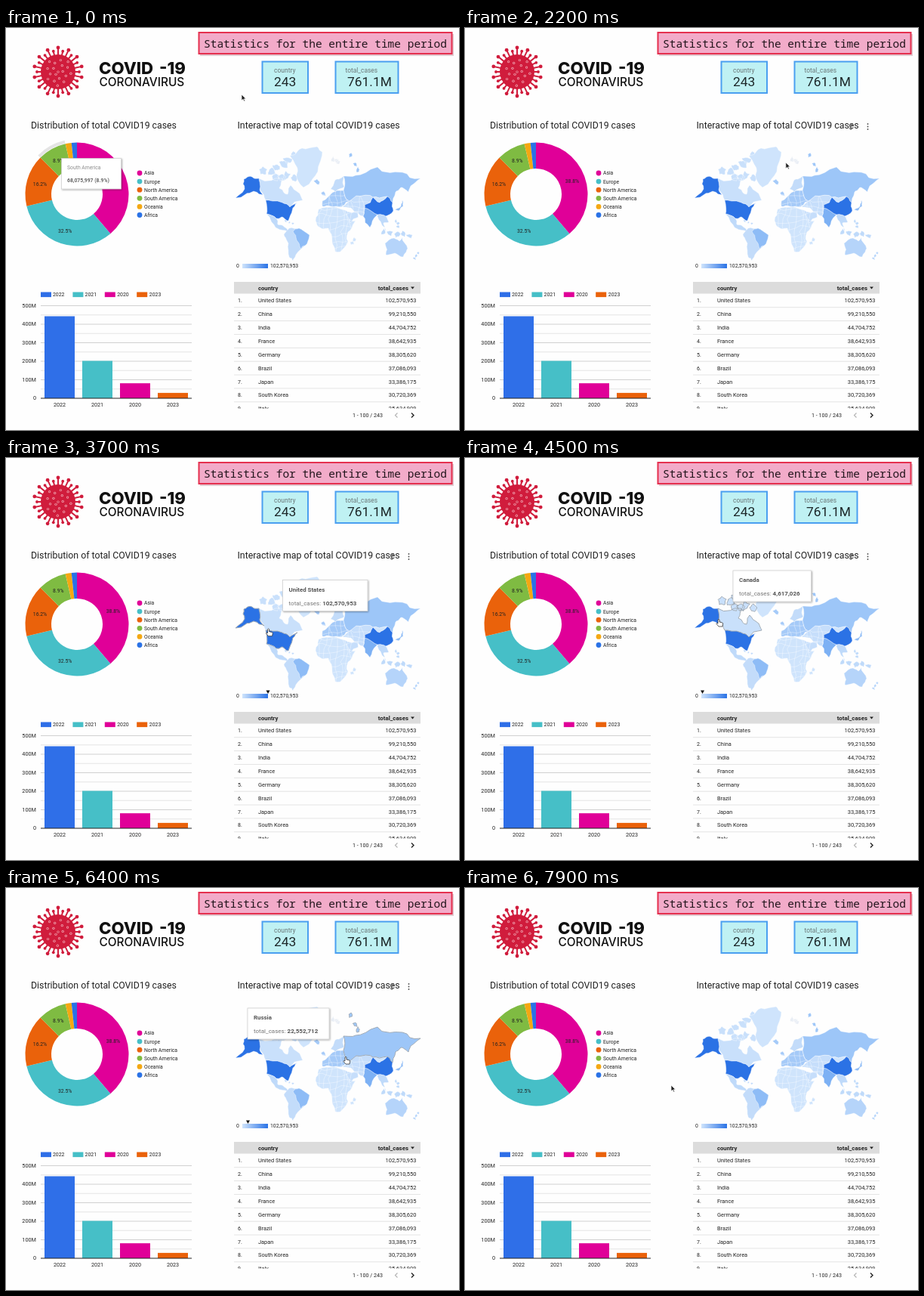
An HTML page that plays this animation: 600x532 px, repeating every 8000 ms.

```html
<!DOCTYPE html>
<html lang="en">
<head>
<meta charset="utf-8">
<title>COVID-19 dashboard</title>
<style>
html, body { margin: 0; width: 100%; height: 100%; overflow: hidden; background: #fefefe; }
svg { display: block; width: 600px; height: 532px; font-family: Roboto, Arial, sans-serif; }
</style>
</head>
<body>
<svg viewBox="0 0 600 532">
  <defs>
    <linearGradient id="scale"><stop stop-color="#cfe4fc"/><stop offset="1" stop-color="#2b73e6"/></linearGradient>
    <clipPath id="tableClip"><path d="M300 334H552V503.5H300Z"/></clipPath>
    <filter id="shadow" x="-20%" y="-30%" width="140%" height="170%">
      <feDropShadow dx="1" dy="1" stdDeviation="1.2" flood-opacity=".35"/>
    </filter>
  </defs>
  <g id="page"></g>
  <g id="overlay"></g>
</svg>
<script>
const page = document.getElementById('page'), overlay = document.getElementById('overlay');
const MAGENTA = '#e00098', TEAL = '#46bfc7', ORANGE = '#ea620b', GREEN = '#7fbb42', BLUE = '#2f6fe8';
const END = 'text-anchor="end"', MID = 'text-anchor="middle"', BOLD = 'font-weight="700"';

const text = (x, y, s, size, fill = '#222', extra = '') =>
  `<text x="${x}" y="${y}" font-size="${size}" fill="${fill}" ${extra}>${s}</text>`;
const rect = (x, y, w, h, fill, extra = '') =>
  `<rect x="${x}" y="${y}" width="${w}" height="${h}" fill="${fill}" ${extra}/>`;
const path = (d, fill, extra = '') => `<path d="${d}" fill="${fill}" ${extra}/>`;
const circle = (x, y, r, fill) => `<circle cx="${x}" cy="${y}" r="${r}" fill="${fill}"/>`;
const line = (d, stroke, width = 1, extra = '') => path(d, 'none', `stroke="${stroke}" stroke-width="${width}" ${extra}`);
const polar = (cx, cy, r, turn) => {
  const a = turn * 2 * Math.PI;
  return [cx + r * Math.sin(a), cy - r * Math.cos(a)];
};
const ring = (cx, cy, r0, r1, a, b) =>
  `M${polar(cx, cy, r1, a)}A${r1} ${r1} 0 0 1 ${polar(cx, cy, r1, b)}` +
  `L${polar(cx, cy, r0, b)}A${r0} ${r0} 0 0 0 ${polar(cx, cy, r0, a)}Z`;

function virus(cx, cy) {
  const red = '#d01c3c', pale = '#f3b5bf', spikes = 28;
  let out = circle(cx, cy, 23, red);
  for (let i = 0; i < spikes; i++) {
    const long = i % 2 === 0, [x, y] = polar(cx, cy, long ? 32 : 28, i / spikes);
    out += line(`M${polar(cx, cy, 21, i / spikes)}L${x} ${y}`, red, 2) + circle(x, y, long ? 2.4 : 1.9, red);
  }
  for (let i = 0; i < 19; i++) {
    const [x, y] = polar(cx, cy, 4.4 * Math.sqrt(i), i * .618);
    out += circle(x, y, 1.6, pale) + circle(x, y, .9, red);
  }
  return out;
}

function header() {
  const card = (x, w, inset, name, value, size) =>
    rect(x, 44.5, w, 41.5, '#bff1f3', 'stroke="#4a9ff0" stroke-width="2"') +
    text(x + inset, 59, name, size, '#6b7778') + text(x + 15.5, 77, value, 17.4, '#1d2728');
  const logo = (x, y, s, size, weight) =>
    text(x, y, s, size, '#111', `font-family="Inter, Arial, sans-serif" font-weight="${weight}"`);
  return virus(69, 58) + logo(123, 60.5, 'COVID', 22.2, 800) + logo(203, 60.5, '-19', 22.2, 800) +
    logo(123.5, 76.5, 'CORONAVIRUS', 15.4, 500) +
    rect(257, 8, 336, 29, '#a86a7c', 'opacity=".35"') +
    rect(255.5, 6, 335, 28, '#f2abc9', 'stroke="#e5304f" stroke-width="2"') +
    text(262, 25.5, 'Statistics for the entire time period', 14.5, '#22151c',
      'font-family="Noto Sans Mono, DejaVu Sans Mono, monospace"') +
    card(339.5, 60.5, 15.5, 'country', '243', 8.5) + card(436.5, 83, 13, 'total_cases', '761.1M', 8.4) +
    text(33, 132.5, 'Distribution of total COVID19 cases', 12.3) +
    text(306.5, 132.5, 'Interactive map of total COVID19 cases', 12.35);
}

function donut() {
  const parts = [['Asia', 38.8, MAGENTA], ['Europe', 32.5, TEAL], ['North America', 16.2, ORANGE],
    ['South America', 8.9, GREEN], ['Oceania', 1.9, '#f4a812'], ['Africa', 1.7, '#2a72e6']];
  let out = '', at = 0;
  parts.forEach(([name, share, color], i) => {
    const [x, y] = polar(94, 220, 51, (at + share / 2) / 100);
    out += path(ring(94, 220, 34, 68.5, at / 100, (at + share) / 100), color);
    if (share > 5) out += text(x, y + 2.6, share + '%', 6.8, '#222', MID);
    out += circle(177, 192 + i * 11.1, 3.4, color) + text(183, 194.4 + i * 11.1, name, 6.8);
    at += share;
  });
  return out;
}

function bars() {
  const data = [['2022', 443, BLUE], ['2021', 202, TEAL], ['2020', 81, MAGENTA], ['2023', 29, ORANGE]];
  let out = '';
  for (let i = 0; i < 10; i++)
    out += line(`M46 ${367.5 + i * 12.25}H246`, i % 2 ? '#e3e3e3' : '#cbcbcb', .9);
  for (let i = 0; i < 6; i++)
    out += text(40, 369.8 + i * 24.5, i < 5 ? 500 - i * 100 + 'M' : '0', 7.3, '#222', END);
  data.forEach(([year, millions, color], i) => {
    const h = millions * .245;
    out += rect(46 + i * 42.4, 349.5, 14, 6.6, color) + text(62 + i * 42.6, 355.3, year, 6.9) +
      rect(51 + i * 50, 490 - h, 40, h, color) + text(71 + i * 50, 500.5, year, 7.2, '#222', MID);
  });
  return out + line('M46 490H246', '#222');
}

function table() {
  const rows = [['United States', '102,570,953'], ['China', '99,210,550'], ['India', '44,704,752'],
    ['France', '38,642,935'], ['Germany', '38,305,620'], ['Brazil', '37,086,093'],
    ['Japan', '33,386,175'], ['South Korea', '30,720,369'], ['Italy', '25,634,909']];
  let out = rect(302, 336, 247, 15.5, '#dcdcdc') + text(334, 346.6, 'country', 7.7, '#222', BOLD) +
    text(533, 346.6, 'total_cases', 7.9, '#222', BOLD + ' ' + END) + path('M536 342.5H541L538.5 345.5Z', '#222');
  out += '<g clip-path="url(#tableClip)">';
  rows.forEach(([name, cases], i) => {
    const y = 363.3 + i * 17.87;
    out += text(307, y, i + 1 + '.', 7) + text(334, y, name, 7.4) + text(543.5, y, cases, 7.5, '#222', END) +
      line(`M302 ${y + 6.4}H549`, '#dedede', .8);
  });
  return out + '</g>' + text(459, 514.8, '1 - 100 / 243', 7.15) +
    line('M518.5 509.5l-3 3 3 3', '#b5b5b5', 1.2) + line('M537 509.5l3 3-3 3', '#222', 1.4);
}

// Repeatable noise in -0.5..0.5, so that neighbours share the same wiggly border.
const noise = (x, y) => {
  const n = Math.sin(x * 12.9898 + y * 78.233) * 43758.5453;
  return n - Math.floor(n) - .5;
};
function wiggle(points, depth = 2) {
  if (!depth) return points;
  const out = [points[0]];
  for (let i = 1; i < points.length; i++) {
    const [ax, ay] = points[i - 1], [bx, by] = points[i];
    const mx = (ax + bx) / 2, my = (ay + by) / 2, bend = Math.hypot(bx - ax, by - ay) * .28;
    out.push([mx + noise(mx, my) * bend, my + noise(my, mx) * bend], points[i]);
  }
  return wiggle(out, depth - 1);
}
const trace = points => 'M' + wiggle(points).map(p => p.map(v => v.toFixed(1)).join(' ')).join('L');
const coast = corners => {
  const points = corners.split(',').map(p => p.trim().split(' ').map(Number));
  return trace([...points, points[0]]) + 'Z';
};
// A row of n small islands between two points, strewn to both sides.
function isles(n, x0, y0, x1, y1, spread, size) {
  let d = '';
  for (let i = 0; i < n; i++) {
    const p = n > 1 ? i / (n - 1) : 0;
    const x = x0 + (x1 - x0) * p + noise(i, x0) * spread, y = y0 + (y1 - y0) * p + noise(y0, i) * spread;
    const corners = [0, .2, .4, .6, .8, 0].map(a => polar(x, y, size * (1 + noise(x, a)), a));
    d += trace(corners) + 'Z';
  }
  return d;
}

const USA = coast('344 228,366 231,376 237,386 231,379 242,374 255,366 250,358 252,345 246') +
  coast('315 200,326 197,335 199,336 214,342 222,328 216,304 225,316 213');
const CANADA = coast('335 199,366 199,362 212,373 220,377 208,389 219,393 228,376 237,366 231,344 228,336 214') +
  isles(6, 343, 191, 381, 168, 6, 5.5) + isles(4, 357, 194, 382, 200, 6, 5);
const RUSSIA = coast('447 196,463 195,492 184,525 191,549 199,536 209,533 217,523 211,516 217,512 231,505 223,486 224,464 222,455 229,447 215') +
  isles(3, 458, 170, 466, 189, 4, 3);
const NORDIC = coast('430 213,436 201,447 196,448 210,436 217');
const AFRICA = coast('414 240,434 237,449 241,456 256,463 255,453 270,453 282,444 295,436 296,431 273,427 265,416 264,410 255');
const EUROPE = coast('419 236,419 229,432 218,447 215,455 229,447 235,437 236,425 235') + isles(2, 421, 219, 412, 204, 0, 3.2);
const MIDEAST = coast('455 229,464 222,486 224,475 234,475 238,473 249,457 238,446 237') + coast('449 241,466 243,467 250,456 258');
const LAND = [
  ['#c9e0fb', CANADA],
  ['#cfe4fc', coast('376 169,392 159,412 157,419 164,413 190,394 211,385 198,386 186')],
  ['#2b72e5', USA],
  ['#bfdafa', coast('345 246,358 252,360 260,366 261,376 271,357 264') + isles(3, 370, 255, 380, 259, 1, 1.5)],
  ['#c3dcfa', coast('375 265,388 265,402 274,396 288,384 300,380 308,375 303,374 285,368 273')],
  ['#8ebcf6', coast('380 269,388 265,402 274,396 288,390 292,385 281')],
  ['#cfe4fc', AFRICA + isles(2, 461, 280, 459, 284, 0, 2.5)],
  ['#a5caf8', EUROPE],
  ['#c3dcfa', NORDIC],
  ['#e9eef5', isles(3, 434, 173, 440, 178, 3, 3)],
  ['#c6defb', MIDEAST],
  ['#9dc6f8', RUSSIA],
  ['#7db1f4', coast('473 249,475 238,492 247,482 264')],
  ['#bfdafa', coast('492 247,503 249,507 257,500 258,503 269,496 256') + isles(5, 500, 270, 534, 276, 5, 3.4) + isles(3, 517, 255, 520, 264, 2, 2)],
  ['#cfe4fc', coast('486 224,505 223,495 231')],
  ['#2b72e5', coast('475 234,486 224,495 231,505 223,512 231,513 242,503 249,492 247,475 238')],
  ['#8ebcf6', coast('515 241,523 236,525 228,526 236,520 242')],
  ['#b5d4fa', coast('502 285,514 278,521 282,525 277,532 292,526 303,515 298,503 300') + isles(3, 546, 298, 541, 305, 1, 2)]
];

function worldMap() {
  let borders = '';
  for (let i = 0; i < 9; i++) {
    const x = 416 + i * 7, y = 220 + i * 9;
    borders += trace([[x, 212], [x + 2, 240], [x - 1, 270], [x, 300]]) + trace([[405, y], [430, y + 2], [455, y - 2], [490, y]]);
  }
  return LAND.map(([fill, d]) => path(d, fill, 'stroke="#fff" stroke-width=".4"')).join('') +
    `<clipPath id="states">${path(AFRICA + EUROPE + MIDEAST, '#000')}</clipPath>` +
    line(borders, '#fff', .5, 'opacity=".7" clip-path="url(#states)"') +
    text(305, 317.3, '0', 6.8) + rect(313, 312, 34, 6, 'url(#scale)') + text(350, 317.3, '102,570,953', 6.8);
}

// Where the pointer stops, and what it finds there.
const STOPS = [
  { at: 0, x: 312, y: 88 },
  { at: 1900, x: 440, y: 165 },
  { at: 3000, x: 357, y: 236, name: 'United States', cases: '102,570,953', land: USA },
  { at: 4500, x: 336, y: 213, name: 'Canada', cases: '4,617,026', land: CANADA },
  { at: 5300, x: 435, y: 212, name: 'Norway', cases: '1,480,225', land: NORDIC },
  { at: 6400, x: 450, y: 223, name: 'Russia', cases: '22,552,712', land: RUSSIA },
  { at: 7900, x: 273, y: 261 }
];

function pointerAt(t) {
  const i = STOPS.findIndex(s => s.at >= t) || 1, a = STOPS[i - 1], b = STOPS[i];
  const p = (t - a.at) / (b.at - a.at), e = p * p * (3 - 2 * p);
  return { x: a.x + (b.x - a.x) * e, y: a.y + (b.y - a.y) * e, hover: p < .5 ? a : b };
}

const tipBox = (x, y, w, h) => rect(x, y, w, h, '#fff', 'stroke="#ccc" stroke-width=".7" filter="url(#shadow)"');

function mapTip({ name, cases, land }, x, y) {
  const w = 64 + 4.4 * cases.length, left = x > 400 ? x - 22 - w : x + 19, top = y - 64;
  const mark = 313 + 34 * cases.replaceAll(',', '') / 102570953;
  return line(land, '#8f9aa5', .8) + path(`M${mark - 2.5} 307.5h5l-2.5 4.5z`, '#111') +
    tipBox(left, top, w, 41) + text(left + 8, top + 15, name, 7.9, '#555', BOLD) +
    text(left + 8, top + 33, `total_cases: <tspan font-weight="700" fill="#555">${cases}</tspan>`, 8, '#777');
}

const sliceTip = () =>
  path(ring(94, 220, 69, 73, .875, .964), '#cfcfcf', 'opacity=".55"') +
  tipBox(73.5, 172.5, 79, 40.5) + text(81, 187.3, 'South America', 6.8, '#8c8c8c') +
  text(81, 203.6, '68,075,997 (8.9%)', 6.8, '#666', BOLD);

const chartMenu = () => path('M508 129l3-3.5 3 3.5h-2v3.5h2.5l-3.5 2.5-3-2.5h2v-3.5z', '#777') +
  [127, 130.5, 134].map(y => circle(533.5, y, .95, '#555')).join('');

const ARROW = 'M0 0v8l2-1.8 1.3 2.8 1.3-.6-1.3-2.6h2.5z';
const HAND = 'M-1 1Q0-.6 1 1V4L5 5Q6 5.4 5.6 7L5 10H0L-3 6.5Q-3 4.8-1 6Z';

function draw(now) {
  const t = Math.floor(now % 8000 / 100) * 100, { x, y, hover } = pointerAt(t);
  const tip = t >= 2500 && t < 7000 && hover.name;
  let out = t < 200 ? sliceTip() : '';
  if (t >= 1900 && t < 7500) out += chartMenu();
  if (tip) out += mapTip(hover, x, y);
  if (t < 600 || t >= 1900)
    out += path(tip ? HAND : ARROW, tip ? '#fff' : '#222',
      `transform="translate(${x} ${y})" stroke="${tip ? '#222' : '#fff'}" stroke-width=".7"`);
  overlay.innerHTML = out;
  requestAnimationFrame(draw);
}

page.innerHTML = header() + donut() + bars() + table() + worldMap();
requestAnimationFrame(draw);
</script>
</body>
</html>
```
